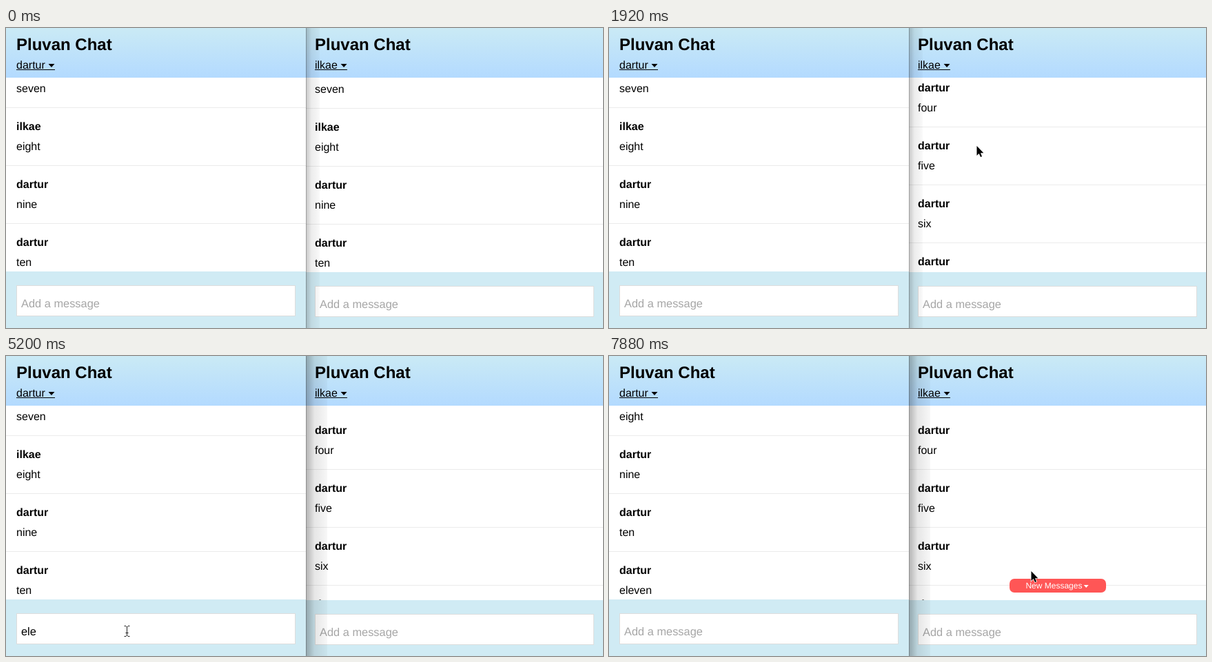
Write an HTML page that moves like this. It is 866 px wide and 435 px high and loops after 8 s.

```html
<!DOCTYPE html>
<html lang="en">
<head>
<meta charset="utf-8">
<style>
  html, body { margin: 0; width: 100%; height: 100%; overflow: hidden; background: #fff; }
  svg { display: block; font: 16px "Liberation Sans", Arial, sans-serif; text-rendering: geometricPrecision; }
  .bold { font-weight: bold; }
  .title { font-weight: bold; font-size: 24px; }
  .field { font-size: 16.4px; }
  .pill { font-size: 12px; fill: #fff; }
</style>
</head>
<body>
<svg width="866" height="435" viewBox="0 0 866 435">
  <defs>
    <linearGradient id="sky" x2="0" y2="1">
      <stop stop-color="#caeaf5"/><stop offset="1" stop-color="#b3daff"/>
    </linearGradient>
    <linearGradient id="shade">
      <stop stop-color="#000" stop-opacity=".3"/>
      <stop offset=".4" stop-color="#000" stop-opacity=".1"/>
      <stop offset="1" stop-color="#000" stop-opacity=".03"/>
    </linearGradient>
  </defs>
  <g id="scene"></g>
</svg>
<script>
// The screen is sampled once per TICK ms; all times below are in ticks.
const LOOP = 8000, TICK = 148.5;
const FOCUS = 21, SENT = 42;
const words = ['four', 'five', 'six', 'seven', 'eight', 'nine', 'ten', 'eleven'];
// each entry also restarts the blinking text caret
const typing = [[FOCUS, ''], [28, 'e'], [32, 'ele'], [36, 'elev'], [37, 'eleve'], [39, 'eleven'], [SENT, ''], [48, '']];
// pointer strokes: start, end, then the points of a quadratic curve
const strokes = [
  { from: 3, to: 6, path: [[370, 397], [440, 270], [533, 170]] },
  { from: 14, to: 19, path: [[533, 170], [382, 309], [172, 398]] },
  { from: 48, to: 53, path: [[172, 398], [450, 260], [612, 311]] }
];

const scene = document.getElementById('scene');
const ruler = document.createElement('canvas').getContext('2d');
ruler.font = '16.4px "Liberation Sans", Arial, sans-serif';

const progress = (n, from, to) => Math.min(1, Math.max(0, (n - from) / (to - from)));
const easeOut = p => 1 - (1 - p) ** 2;
const fling = p => (1 - (1 - p) ** 2.32) ** 1.79;

const rect = (x, y, w, h, fill, more = '') =>
  `<rect x="${x}" y="${y}" width="${w}" height="${h}" fill="${fill}" ${more}/>`;
const text = (x, y, str, cls = '', more = '') =>
  `<text x="${x}" y="${y}" class="${cls}" ${more}>${str}</text>`;
const arrowDown = (x, y, w, h, fill) =>
  `<path d="M${x} ${y}h${w}l${-w / 2} ${h}z" fill="${fill}"/>`;

function panel(x, dy, scroll, user, count, typed) {
  const left = x + 15, nameWidth = ruler.measureText(user).width * 16 / 16.4;
  let out = rect(x, 0, 435, 435, '#fff');
  words.slice(0, count).forEach((word, i) => {
    const end = 115 + dy + 84 * (i - 3) + scroll;
    out += text(left, end - 51, word === 'eight' ? 'ilkae' : 'dartur', 'bold')
      + text(left, end - 22, word) + rect(x, end, 435, 1, '#ebebeb');
  });
  return out
    + rect(x, 0, 435, 72, 'url(#sky)')
    + text(left, 32, 'Pluvan Chat', 'title')
    + text(left, 59, user)
    + rect(left, 60, Math.round(nameWidth + 14), 1, '#000')
    + arrowDown(left + nameWidth + 4.7, 52, 9, 5, '#000')
    + rect(x, 353 + dy, 435, 82, '#d0ebf4')
    + rect(left + .5, 373.5 + dy, 404, 44, '#fff', 'stroke="#ddd"')
    + text(left + 7, 405 + dy, typed || 'Add a message', 'field', typed ? '' : 'fill="#a6a6a6"');
}

function caret(n, typed, since) {
  if (n - since >= 3) return '';
  return rect(Math.floor(22 + ruler.measureText(typed).width), 390, 1, 18, '#000');
}

function pointer(n) {
  const stroke = strokes.filter(s => s.from <= n).pop();
  if (!stroke) return '';
  const t = easeOut(progress(n, stroke.from, stroke.to)), [a, b, c] = stroke.path;
  const [x, y] = a.map((v, i) => (1 - t) ** 2 * v + 2 * t * (1 - t) * b[i] + t * t * c[i]);
  const overField = n > FOCUS && y > 374;
  const shape = overField
    ? '<path d="M-.5-6.5H2l1.5 1.5L5-6.5H7.5M-.5 8.5H2L3.500 7 5 8.500H7.500M3.500-5V7M1.500 3.500h4" fill="none" stroke="#222"/>'
    : '<path d="M.5 1V15L3.700 12 6 17 8 16.200 6 11.200H10.300z" stroke="#fff" stroke-width="1.500" paint-order="stroke"/>';
  return `<g transform="translate(${Math.round(x)} ${Math.round(y)})">${shape}</g>`;
}

function draw(n) {
  const [since, typed] = typing.filter(k => k[0] <= n).pop() || [-9, ''];
  const sent = n >= SENT, active = n >= FOCUS;
  const scroll = Math.round(300 * fling(progress(n, 7, 15)));
  scene.innerHTML =
    panel(433, 1, scroll, 'ilkae', 7, '')
    + `<g opacity="${progress(n, SENT, 45)}">`
    + rect(581, 323, 140, 20, '#ff5656', 'rx="7"')
    + text(604.4, 337, 'New Messages', 'pill')
    + arrowDown(688.7, 332, 7, 4, '#fff') + '</g>'
    + rect(435, 0, active ? 31 : 20, 435, 'url(#shade)', `opacity="${active ? 1 : .75}"`)
    + rect(435, 0, 1, 435, '#000', 'opacity=".2"')
    + panel(0, 0, sent ? -84 : 0, 'dartur', sent ? 8 : 7, typed)
    + caret(n, typed, since)
    + pointer(n);
}

let last = -1;
function frame(now) {
  const n = Math.floor((now % LOOP + 16) / TICK);
  if (n !== last) draw(last = n);
  requestAnimationFrame(frame);
}
draw(0);
requestAnimationFrame(frame);
</script>
</body>
</html>
```
